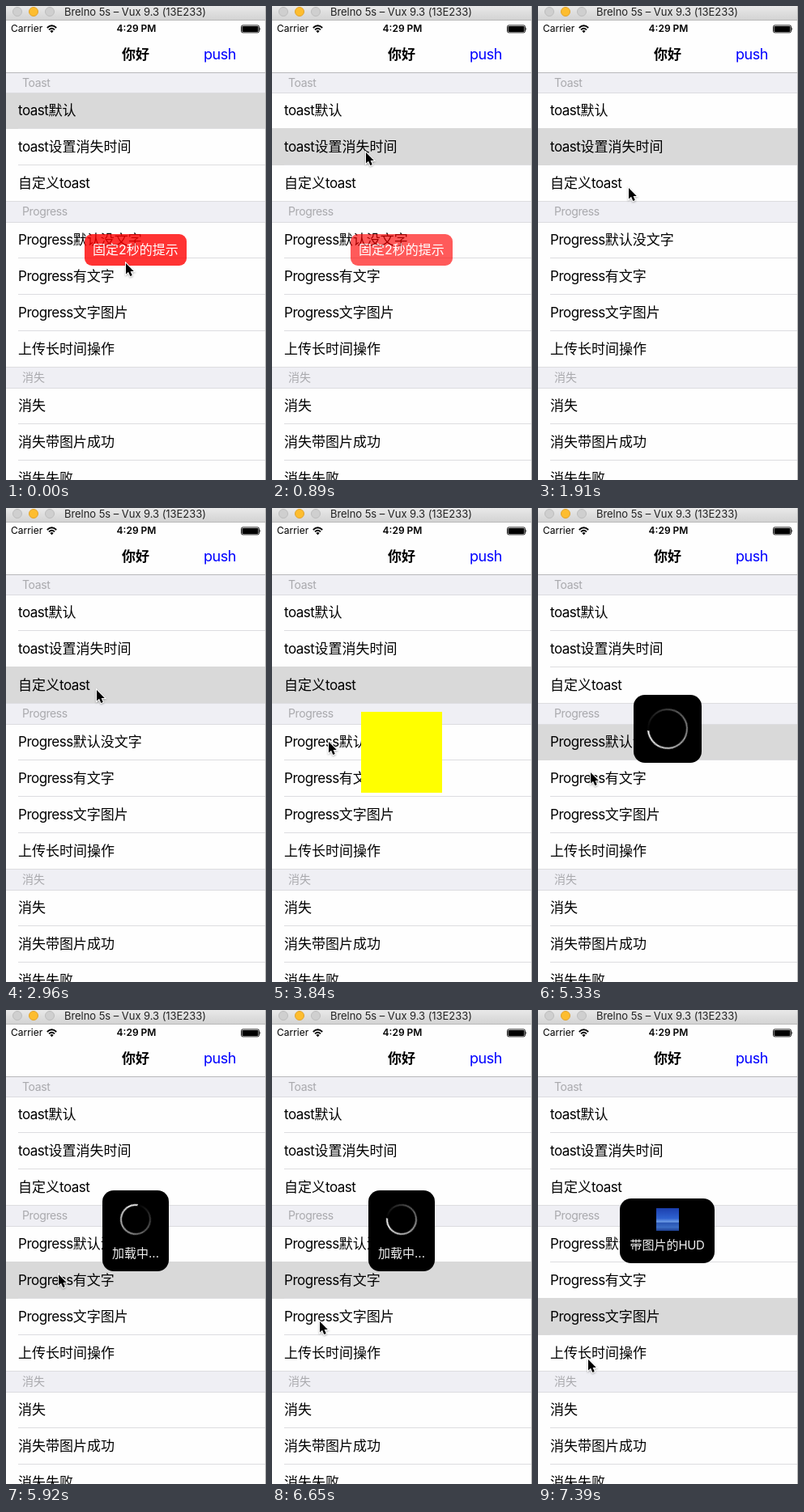
Animation, 321 px wide and 586 px high, one loop 8 s. Source, as an HTML page:

```html
<!DOCTYPE html>
<html lang="zh-CN">
<head>
<meta charset="utf-8">
<title>Toast and HUD demo</title>
<style>
html, body { margin: 0; width: 100%; height: 100%; overflow: hidden; background: #fefefe; }
body { position: relative; color: #000; font: 17px Inter, "Noto Sans CJK SC", "Noto Sans CJK", sans-serif; white-space: nowrap; }
body > * { position: absolute; box-sizing: border-box; }
i { font-style: normal; letter-spacing: -.028em; }

/* Window and bars */
.window { left: 0; top: 0; width: 320px; height: 18px; background: linear-gradient(#e9e9e9, #d3d3d3); border-bottom: 1px solid #b9b9b9; }
.window b { position: absolute; top: 1px; width: 12px; height: 12px; box-sizing: border-box; border-radius: 50%; background: #cfcfcf; border: 1px solid #bdbdbd; }
.window .mid { background: #fdbd2f; border-color: #e2a32c; }
.window span { position: absolute; left: 72px; top: -1px; font-size: 13px; line-height: 16px; letter-spacing: -.05px; color: #222; }
.status { font-size: 12px; line-height: 20px; top: 18px; }
.nav { left: 0; top: 82px; width: 320px; height: 1px; background: #b8b8bb; }
.title { left: 0; width: 320px; top: 46px; line-height: 28px; text-align: center; font-weight: 700; }
.push { left: 244px; top: 46px; font-size: 18px; line-height: 28px; color: #00f; }
.edge { left: 320px; top: 0; width: 1px; height: 586px; background: #b4b4b4; }

/* Table */
.table { left: 0; top: 83px; width: 320px; isolation: isolate; }
.head, .row { position: relative; box-sizing: border-box; }
.head { z-index: 1; height: 25px; padding-left: 20px; line-height: 24px; font-size: 14px; color: #a9a9ad; background: #efeff4; box-shadow: 0 1px #dcdce0; }
.head:first-child { height: 24px; }
.row { height: 45px; padding-left: 15px; line-height: 45px; }
.row::after { content: ""; position: absolute; left: 15px; right: 0; bottom: 0; height: 1px; background: #dddde0; }
.row.last::after { left: 0; }
.row span { position: relative; }
.row::before { content: ""; position: absolute; inset: -1px 0 0; background: #d9d9d9; opacity: 0; animation: var(--pick, none) 8s step-end infinite; }
@keyframes pick1 { 0% { opacity: 1 } 9.25%, 100% { opacity: 0 } }
@keyframes pick2 { 0% { opacity: 0 } 9.25% { opacity: 1 } 37%, 100% { opacity: 0 } }
@keyframes pick3 { 0% { opacity: 0 } 37% { opacity: 1 } 57.375%, 100% { opacity: 0 } }
@keyframes pick4 { 0% { opacity: 0 } 57.375% { opacity: 1 } 72.125%, 100% { opacity: 0 } }
@keyframes pick5 { 0% { opacity: 0 } 72.125% { opacity: 1 } 84.875%, 100% { opacity: 0 } }
@keyframes pick6 { 0% { opacity: 0 } 84.875%, 100% { opacity: 1 } }

/* Overlays */
.pop { text-align: center; color: #fff; opacity: 0; animation: 8s step-end infinite; }
.toast { left: 97px; top: 282px; width: 126px; height: 39px; border-radius: 9px; background: #f00; font-size: 16px; line-height: 39px; animation-name: toast; }
.square { left: 110px; top: 252px; width: 100px; height: 100px; background: #ff0; animation-name: square; }
.hud { background: #000; border-radius: 14px; font-size: 15px; }
.hud p { position: absolute; left: 0; right: 0; margin: 0; line-height: 20px; color: #f2f2f2; }
.plain { left: 118px; top: 231px; width: 84px; height: 84px; animation-name: plain; }
.load { left: 119px; top: 223px; width: 82px; height: 100px; animation-name: load; }
.photo { left: 101px; top: 233px; width: 117px; height: 80px; animation-name: photo; }
.load p { top: 68px; }
.photo p { top: 48px; }
.photo b { position: absolute; left: 45px; top: 12px; width: 28px; height: 28px;
  background: linear-gradient(#1c3fae, #2f62d0 45%, #6c9be4 60%, #2a56b4 66%, #3b6cc4 84%, #1d3f92); }
@keyframes toast {
  0% { opacity: .8 } 9.25% { opacity: .78 } 11.125% { opacity: .65 } 12.875% { opacity: .48 }
  14.75% { opacity: .3 } 16.625% { opacity: .14 } 18.375%, 100% { opacity: 0 }
}
@keyframes square { 0% { opacity: 0 } 38.875% { opacity: .5 } 40.75% { opacity: 1 } 57.375% { opacity: .6 } 59.25%, 100% { opacity: 0 } }
@keyframes plain { 0% { opacity: 0 } 57.375% { opacity: .5 } 59.25% { opacity: 1 } 72.125%, 100% { opacity: 0 } }
@keyframes load { 0% { opacity: 0 } 72.125% { opacity: 1 } 84.875%, 100% { opacity: 0 } }
@keyframes photo { 0% { opacity: 0 } 84.875%, 100% { opacity: 1 } }

.ring { position: absolute; left: 50%; width: var(--d); height: var(--d); margin-left: calc(var(--d) / -2); border-radius: 50%;
  background: conic-gradient(from var(--from), #000, #fff); animation: spin 8s -20ms steps(54) infinite; }
.ring::after { content: ""; position: absolute; inset: 2px; border-radius: 50%; background: #000; }
.plain .ring { --d: 50px; --from: 145deg; top: 17px; }
.load .ring { --d: 38px; --from: 35deg; top: 17px; }
@keyframes spin { to { transform: rotate(2880deg) } }

/* Pointer: the tip sits at the translated point */
.pointer { left: -3px; top: -2px; filter: drop-shadow(0 1px 1px rgba(0,0,0,.3)); animation: pointer 8s step-end infinite; }
@keyframes pointer {
  0% { transform: translate(149px, 318px) }
  1.75% { transform: translate(133px, 243px) }
  3.625% { transform: translate(117px, 181px) }
  18.375% { transform: translate(117px, 190px) }
  20.25% { transform: translate(115px, 211px) }
  22% { transform: translate(112px, 224px) }
  23.875% { transform: translate(113px, 225px) }
  44.375% { transform: translate(121px, 240px) }
  46.25% { transform: translate(92px, 270px) }
  48% { transform: translate(71px, 289px) }
  61.125% { transform: translate(70px, 299px) }
  62.875% { transform: translate(68px, 315px) }
  64.75% { transform: translate(66px, 327px) }
  77.625% { transform: translate(64px, 343px) }
  79.375% { transform: translate(61px, 370px) }
  81.25% { transform: translate(60px, 385px) }
  90.5% { transform: translate(61px, 412px) }
  92.375%, 100% { transform: translate(63px, 432px) }
}
</style>
</head>
<body>
<div class="window">
  <b style="left:8px"></b><b class="mid" style="left:28px"></b><b style="left:48px"></b>
  <span>Brelno 5s – Vux 9.3 (13E233)</span>
</div>

<div class="status" style="left:6px">Carrier</div>
<svg style="left:50px;top:23px" width="13" height="11" fill="none" stroke="#000" stroke-width="1.8">
  <path d="M.8 4Q6.5-1.6 12.2 4M3 6.4q3.5-3.3 7 0"/><path d="M4.4 8Q6.5 6.2 8.6 8L6.5 10.2Z" fill="#000" stroke="none"/>
</svg>
<div class="status" style="left:0;width:322px;text-align:center;font-weight:600">4:29 PM</div>
<svg style="left:290px;top:23px" width="26" height="11">
  <rect x=".5" y=".9" width="22" height="9" rx="1.8" fill="none" stroke="#000" stroke-width=".9"/>
  <rect x="1.5" y="1.9" width="20" height="7" rx=".8"/><path d="M23.5 3.6q1.8 1.8 0 3.6Z"/>
</svg>

<div class="title">你好</div>
<div class="push"><i>push</i></div>
<div class="nav"></div>

<div class="table">
  <div class="head"><i>Toast</i></div>
  <div class="row" style="--pick:pick1"><span><i>toast</i>默认</span></div>
  <div class="row" style="--pick:pick2"><span><i>toast</i>设置消失时间</span></div>
  <div class="row last" style="--pick:pick3"><span>自定义<i>toast</i></span></div>
  <div class="head"><i>Progress</i></div>
  <div class="row" style="--pick:pick4"><span><i>Progress</i>默认没文字</span></div>
  <div class="row" style="--pick:pick5"><span><i>Progress</i>有文字</span></div>
  <div class="row" style="--pick:pick6"><span><i>Progress</i>文字图片</span></div>
  <div class="row last"><span>上传长时间操作</span></div>
  <div class="head">消失</div>
  <div class="row"><span>消失</span></div>
  <div class="row"><span>消失带图片成功</span></div>
  <div class="row"><span>消失失败</span></div>
</div>

<div class="pop toast">固定2秒的提示</div>
<div class="pop square"></div>
<div class="pop hud plain"><div class="ring"></div></div>
<div class="pop hud load"><div class="ring"></div><p>加载中...</p></div>
<div class="pop hud photo"><b></b><p>带图片的<i>HUD</i></p></div>

<div class="edge"></div>
<svg class="pointer" width="16" height="22" viewBox="-2 -2 16 22">
  <path d="M0 0V13.6L3.1 10.8 5.3 16 7.8 15 5.6 9.9H9.8Z" stroke="#fff" stroke-width="2" paint-order="stroke"/>
</svg>
</body>
</html>
```
